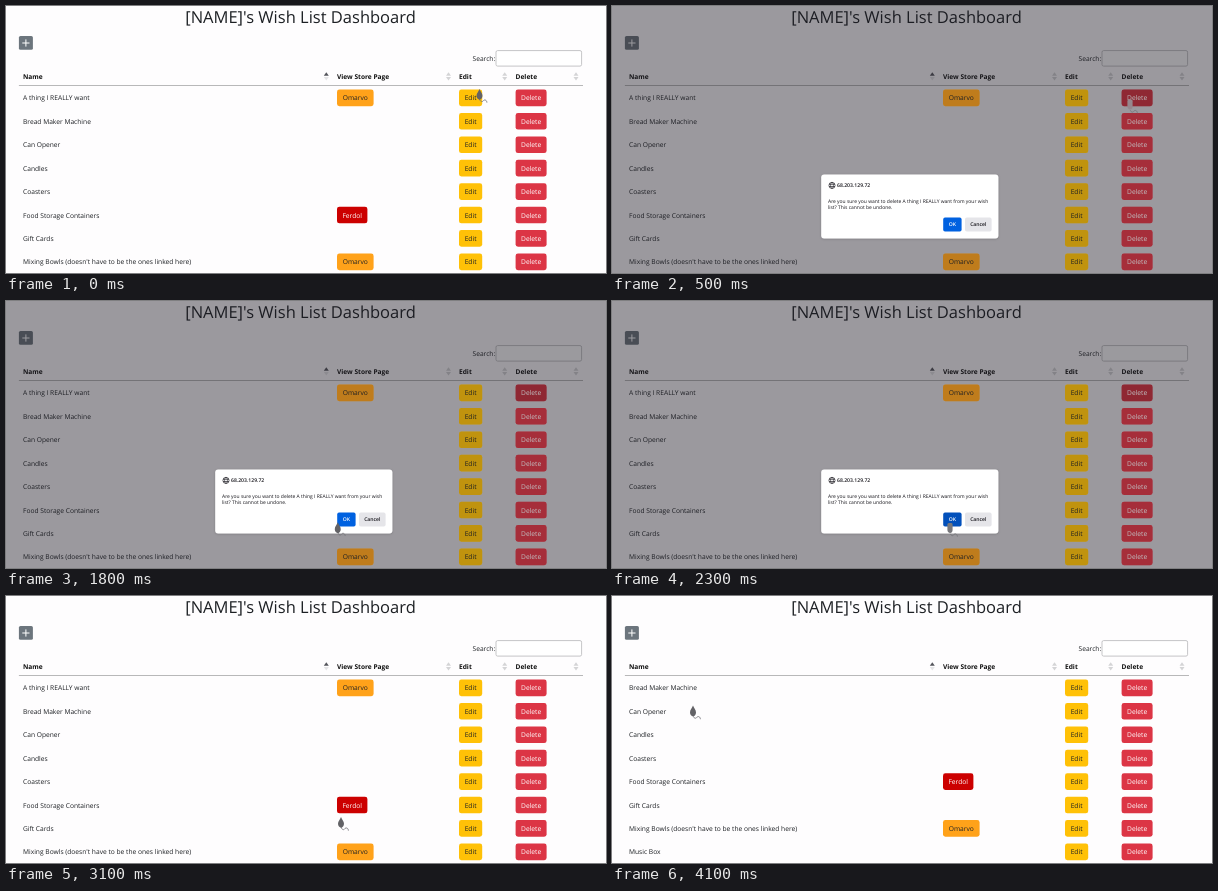
Animation, 600 px wide and 267 px high, one loop 4.2 s. Source, as an HTML page:

```html
<!DOCTYPE html>
<html lang="en">
<head>
<meta charset="utf-8">
<title>Wish List Dashboard</title>
<style>
html, body { margin: 0; width: 100%; height: 100%; overflow: hidden; background: #fefdfe; }
svg { display: block; width: 100%; height: 100%; }
text { font: 6.67px "Open Sans", "Noto Sans", sans-serif; fill: #1d2024; text-rendering: geometricPrecision; white-space: pre; }
.title { font-size: 16.5px; }
.head { font-size: 6.6px; font-weight: 700; fill: #111; }
.small { font-size: 4.97px; fill: #15141a; }
.host { font-size: 5.1px; font-weight: 600; }
.mid { text-anchor: middle; }
.light { fill: #fff; }
.shade { opacity: 0; }
.asking .shade { opacity: .28; }
</style>
</head>
<body>
<svg id="stage" viewBox="0 0 600 267"></svg>
<script>
const LOOP = 4200, STEP = 100, DARK = '#1c1b22';
const stage = document.getElementById('stage');

const text = (x, y, s, cls = '') => `<text x="${x}" y="${y}" class="${cls}">${s}</text>`;
const box = (x, y, w, h, fill, r = 0, extra = '') =>
  `<rect x="${x}" y="${y}" width="${w}" height="${h}" rx="${r}" fill="${fill}" ${extra}/>`;
const rule = (x1, x2, y) => `<path d="M${x1} ${y}H${x2}" stroke="#b0b0b2" stroke-width=".9"/>`;
const group = (id, body) => `<g id="${id}">${body}</g>`;

const button = (x, w, y, fill, label, cls = '', id = '') =>
  box(x, y - 8.2, w, 16.6, fill, 2.4, id && `id="${id}"`) +
  text(x + w / 2, y + 2.6, label, 'mid ' + cls) +
  box(x, y - 8.2, w, 16.6, DARK, 2.4, 'class="shade"');

const sorter = (x, up) =>
  `<path d="M${x - 2.5} 69.8l2.5 -3.6 2.5 3.6z" fill="${up ? '#55565c' : '#d4d4d6'}"/>` +
  `<path d="M${x - 2.5} 71l2.5 3.6 2.5 -3.6z" fill="${up ? '#e4e4e6' : '#d4d4d6'}"/>`;

// Title, add button, search field and column heads; columns are [label x, sorter x].
function header(dx, cols) {
  const labels = ['Name', 'View Store Page', 'Edit', 'Delete'];
  return text(294.5 + dx, 17.3, "[NAME]'s Wish List Dashboard", 'title mid') +
    box(12.9 + dx, 30, 14, 13.8, '#6c757d', 1.6) +
    `<path d="M${16.3 + dx} 37h7.2m-3.6 -3.6v7.2" stroke="#fff" stroke-width="1"/>` +
    text(466.5 + dx, 55.3, 'Search:') +
    box(490 + dx, 44.6, 85.6, 15.5, '#fff', 1.6, 'stroke="#b6b6b9" stroke-width=".8"') +
    cols.map(([x, s], i) => text(x, 73, labels[i], 'head') + sorter(s, i === 0)).join('') +
    rule(12.9 + dx, (dx ? 575.5 : 577) + dx, 79.5);
}

const SHOPS = { a: ['Omarvo', '#ffa21a', 36.6, ''], b: ['Ferdol', '#cc0000', 30.4, 'light'] };
const items = [
  ['A thing I REALLY want', 'a'], ['Bread Maker Machine'], ['Can Opener'], ['Candles'], ['Coasters'],
  ['Food Storage Containers', 'b'], ['Gift Cards'],
  ["Mixing Bowls (doesn't have to be the ones linked here)", 'a'], ['Music Box']
];
const rowY = i => 91.8 + i * 23.42;

const names = list => list.map(([name], i) => text(17, rowY(i) + 2.6, name)).join('');
const buttons = (list, id) => list.map(([, shop], i) => {
  const y = rowY(i);
  let out = '';
  if (shop) {
    const [label, fill, w, cls] = SHOPS[shop];
    out = button(331, w, y, fill, label, cls);
  }
  return out + button(453, 23.2, y, '#ffc107', 'Edit') +
    button(509.6, 31, y, '#dc3545', 'Delete', 'light', i ? '' : id);
}).join('');

const before = items.slice(0, 8), after = items.slice(1);
const globe = `<g fill="none" stroke="#15141a" stroke-width=".6"><circle cx="220" cy="179.4" r="3.1"/>
  <ellipse cx="220" cy="179.4" rx="1.4" ry="3.1"/><path d="M217 178.3h6m-6 2.2h6"/></g>`;

stage.innerHTML = `<defs><filter id="soft" x="-10%" y="-20%" width="120%" height="150%">
    <feDropShadow dx="0" dy=".6" stdDeviation="1.2" flood-opacity=".2"/></filter></defs>` +
  box(0, 0, 600, 267, '#fefdfe') +
  group('table', header(0, [[17, 320.3], [331, 442.5], [453, 498.7], [509.6, 570]]) +
    group('oldNames', names(before)) + group('newNames', names(after)) +
    box(0, 0, 600, 267, DARK, 0, 'id="veil" opacity=".44"') +
    group('oldButtons', buttons(before, 'firstDelete')) + group('newButtons', buttons(after))) +
  group('loading', header(3.5, [[21, 126.5], [138, 355.3], [366.5, 450], [461, 572.5]]) +
    text(297.6, 91.6, 'Loading...', 'mid') + rule(16.4, 579, 97.5) +
    text(16.4, 111.2, 'Showing 0 to 0 of 0 entries')) +
  group('dialog', box(209.2, 168.6, 177.2, 63.8, '#fff', 3, 'filter="url(#soft)"') + globe +
    text(225, 181.3, '68.203.129.72', 'small host') +
    text(216, 196.5, 'Are you sure you want to delete A thing I REALLY want from your wish', 'small') +
    text(216, 203.2, 'list? This cannot be undone.', 'small') +
    box(331.2, 211.6, 18.4, 14, '#0061e0', 1.8, 'id="ok"') + text(340.4, 220.4, 'OK', 'small host mid light') +
    box(353, 211.6, 26.6, 14, '#e5e5e9', 1.8) + text(366.3, 220.4, 'Cancel', 'small host mid')) +
  group('cursor',
    `<path d="M.3 10.8C1.5 13.2 2.8 13 4 11.6S7.3 11.2 7.4 13.6" fill="none" stroke="#77777b" stroke-width=".9"/>
     <path id="drop" d="M0 0C.9 2.6 3 4.2 3 6.8C3 9.2 1.5 10.2 .3 11C-1.5 10.2 -3 9.2 -3 6.8C-3 4.2 -.9 2.6 0 0z" fill="#626266"/>
     <path id="hand" d="M-2.6 1.5Q-2.6 0 -1.2 0H1.4Q2.6 0 2.6 1.8V6.4Q2.6 9.6 .2 10Q-2.6 9.6 -2.6 6.4z" fill="#77777b"/>`);

const el = {};
stage.querySelectorAll('[id]').forEach(n => el[n.id] = n);
const show = (id, on) => el[id].setAttribute('display', on ? 'inline' : 'none');

// Pointer tip: [time, x, y]
const path = [
  [0, 473.5, 83], [300, 518, 93.5], [600, 518, 93.5], [1300, 253.8, 213.5], [1900, 338, 222],
  [2500, 338, 222], [3000, 338.5, 224], [3100, 335, 221], [3400, 292.6, 185.8], [3900, 81, 109.6], [LOOP, 81, 109.6]
];
const smooth = p => p * p * (3 - 2 * p);

function pointer(t) {
  const i = path.findIndex(k => k[0] > t);
  const [t0, x0, y0] = path[i - 1], [t1, x1, y1] = path[i];
  const p = smooth((t - t0) / (t1 - t0));
  return [x0 + (x1 - x0) * p, y0 + (y1 - y0) * p];
}

function draw(t) {
  const asking = t >= 400 && t < 3100;
  const loading = t >= 3200 && t < 3600;
  const done = t >= 3600;
  const onDelete = t >= 300 && t < 700;
  const onOk = t >= 1900 && t < 3100;

  show('table', !loading);
  show('loading', loading);
  for (const part of ['Names', 'Buttons']) {
    show('old' + part, !done);
    show('new' + part, done);
  }
  show('veil', asking);
  show('dialog', asking);
  el.table.setAttribute('class', asking ? 'asking' : '');
  el.firstDelete.setAttribute('fill', t >= 300 && t < 3100 ? '#bb2d3b' : '#dc3545');
  el.ok.setAttribute('fill', onOk ? '#0250bb' : '#0061e0');

  const hand = onDelete || onOk;
  show('hand', hand);
  show('drop', !hand);
  el.hand.setAttribute('fill', onDelete ? '#96878d' : '#77777b');
  const [x, y] = pointer(t);
  el.cursor.setAttribute('transform', `translate(${x} ${y})`);
}

const start = performance.now();
function tick() {
  const t = (performance.now() - start) % LOOP;
  draw(Math.floor(t / STEP) * STEP);
  requestAnimationFrame(tick);
}
draw(0);
tick();
</script>
</body>
</html>
```
